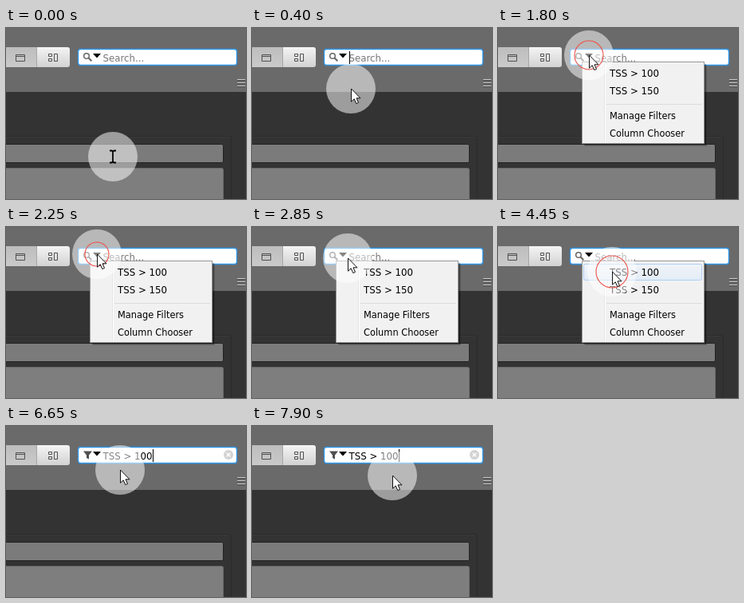
An HTML page that plays this animation: 301 by 214 pixels, repeating every 8000 ms.

```html
<!DOCTYPE html>
<html lang="en">
<head>
<meta charset="utf-8">
<style>
html, body { margin: 0; width: 100%; height: 100%; overflow: hidden; background: #333; }
svg { display: block; width: 301px; height: 214px; }
text { font-family: "DejaVu Sans", sans-serif; font-size: 11.8px; fill: #000; white-space: pre; }
.long { font-size: 11.4px; }
</style>
</head>
<body>
<svg viewBox="0 0 301 214">
  <defs>
    <linearGradient id="light" x2="0" y2="1"><stop stop-color="#f4f4f4"/><stop offset="1" stop-color="#d2d2d2"/></linearGradient>
    <linearGradient id="pressed" x2="0" y2="1"><stop stop-color="#bdbdbd"/><stop offset="1" stop-color="#cacaca"/></linearGradient>
    <linearGradient id="hover" x2="0" y2="1"><stop stop-color="#f1f4f8"/><stop offset="1" stop-color="#e3ecf6"/></linearGradient>
  </defs>

  <!-- window -->
  <rect width="301" height="214" fill="#333"/>
  <rect width="301" height="80" fill="#6a6a6a"/>
  <path d="M0 135.5H280Q282.5 135.5 282.5 138V214" fill="none" stroke="#2b2b2b"/>
  <path d="M0 136.5H280" stroke="#3a3a3a"/>
  <rect x="-5" y="145.5" width="277.5" height="23" rx="2" fill="#7b7b7b" stroke="#222"/>
  <rect x="-5" y="175.5" width="277.5" height="50" rx="2" fill="#7e7e7e" stroke="#6a6a6a"/>
  <path d="M290 64.5H300M290 68.5H300M290 72.5H300" stroke="#d0d0d0"/>
  <path d="M290 65.5H300M290 69.5H300M290 73.5H300" stroke="#444"/>

  <!-- toolbar buttons -->
  <path d="M0 24H38V49H0Z" fill="url(#pressed)"/>
  <path d="M38 24H77Q80 24 80 27V46Q80 49 77 49H38Z" fill="url(#light)"/>
  <path d="M38.5 24V49" stroke="#a5a5a5"/>
  <g fill="none" stroke="#505050">
    <path d="M12.5 33.5H23.5V41.5H12.5ZM12 35.5H24"/>
    <path d="M53.5 32.5H57.5V35.5H53.5ZM53.5 38.5H57.5V41.5H53.5ZM60.5 32.5H64.5V41.5H60.5Z"/>
  </g>

  <!-- search box -->
  <rect x="90.5" y="26.5" width="199" height="20" rx="3" fill="#fff" stroke="#2f95e6" stroke-width="1.4"/>
  <g id="empty">
    <circle cx="101" cy="35" r="3.3" fill="none" stroke="#666" stroke-width="1.5"/>
    <path d="M103.5 37.5L107.3 41.3" stroke="#666" stroke-width="2"/>
    <text x="121.5" y="42" style="fill:#777">Search...</text>
  </g>
  <g id="filled">
    <path d="M97 31.5H108L104 36.5V41.5L101 40V36.5Z" fill="#505050"/>
    <text x="121.5" y="42">TSS &gt; 100</text>
    <circle cx="279" cy="36" r="6" fill="#d3d3d3"/>
    <path d="M276.7 33.7L281.3 38.3M281.3 33.7L276.7 38.3" stroke="#fff" stroke-width="1.5"/>
  </g>
  <path d="M109 32H119L114 37.5Z"/>
  <path id="caret" stroke="#000"/>

  <!-- drop-down -->
  <g id="menu">
    <rect x="109" y="46" width="153" height="102" fill="#000" opacity=".16"/>
    <rect x="108" y="45" width="153" height="102" fill="#000" opacity=".25"/>
    <rect x="105.5" y="42.5" width="153" height="102" fill="#f1f1f1" stroke="#979797"/>
    <path d="M133.5 45V143" stroke="#e2e3e3"/>
    <path d="M134.5 45V143" stroke="#fff"/>
    <path d="M136 95.5H256" stroke="#dcdcdc"/>
    <rect id="row" x="107.5" y="46.5" width="148" height="20" rx="2" fill="url(#hover)" stroke="#aecff7"/>
    <text x="140" y="61">TSS &gt; 100</text>
    <text x="140" y="83">TSS &gt; 150</text>
    <text x="140" y="114" class="long">Manage Filters</text>
    <text x="140" y="136" class="long">Column Chooser</text>
  </g>

  <!-- pointer -->
  <g id="pointer">
    <circle r="31" fill="#fff" opacity=".52"/>
    <circle id="ring" fill="none" stroke="#ee5048" stroke-width="1.1"/>
    <path id="arrow" d="M.5 0V16.2L4.2 12.8L6.8 18.6L9.5 17.4L7 11.8H12Z" fill="#fff" stroke="#111"/>
    <g id="beam" fill="none">
      <path d="M-4 -7.5H-1.5L0 -6.5L1.5 -7.5H4M0 -7V7M-4 7.5H-1.5L0 6.5L1.5 7.5H4" stroke="#000" stroke-width="2"/>
      <path d="M0 -6V6" stroke="#555" stroke-width=".6"/>
    </g>
  </g>
</svg>
<script>
const LOOP = 8000, STEP = 50;
const $ = id => document.getElementById(id);
const show = (id, on) => $(id).setAttribute('display', on ? 'inline' : 'none');

// time, x, y
const path = [
  [0, 134, 161], [200, 130, 112], [400, 124, 76], [600, 118, 54], [850, 113, 40],
  [1050, 113, 40], [1200, 114, 34], [2550, 114, 34], [2750, 116, 36], [2850, 120, 39],
  [2900, 127, 45], [3000, 127, 45], [3250, 143, 54], [3550, 143, 54], [3700, 143, 56],
  [4500, 143, 56], [4600, 143, 55], [7700, 143, 55], [7800, 155, 58], [7900, 176, 62],
  [8000, 176, 62]
];
// first ring, end of rings
const clicks = [[1750, 2500], [4450, 5575]];
const RING = 375;

function place(t) {
  const i = path.findIndex(p => p[0] > t);
  const [t0, x0, y0] = path[i - 1], [t1, x1, y1] = path[i];
  const k = (t - t0) / (t1 - t0);
  return [x0 + (x1 - x0) * k, y0 + (y1 - y0) * k];
}

function radius(t) {
  for (const [from, to] of clicks)
    if (t >= from - STEP && t < to) return 20 - Math.max(0, t - from) % RING / 25;
  return 0;
}

// The caret toggles every 550 ms
const blink = (t, start) => t >= start && Math.floor((t - start) / 550) % 2 === 0;

function draw(time) {
  const t = Math.floor(time % LOOP / STEP) * STEP;
  const [x, y] = place(t), r = radius(t);
  const filled = t >= 4700;

  show('empty', !filled);
  show('filled', filled);
  show('menu', t >= 1700 && t < 4650);
  show('row', t >= 3050);
  show('caret', t < 1700 ? blink(t, 350) : blink(t, 5550));
  $('caret').setAttribute('d', filled ? 'M184.5 29V45' : 'M122.5 29V45');

  $('pointer').setAttribute('transform', `translate(${x} ${y})`);
  $('ring').setAttribute('r', r);
  show('ring', r > 0);
  show('beam', y > 145);
  show('arrow', y <= 145);
}

const begin = performance.now();
function tick() {
  draw(performance.now() - begin);
  requestAnimationFrame(tick);
}
draw(0);
requestAnimationFrame(tick);
</script>
</body>
</html>
```
